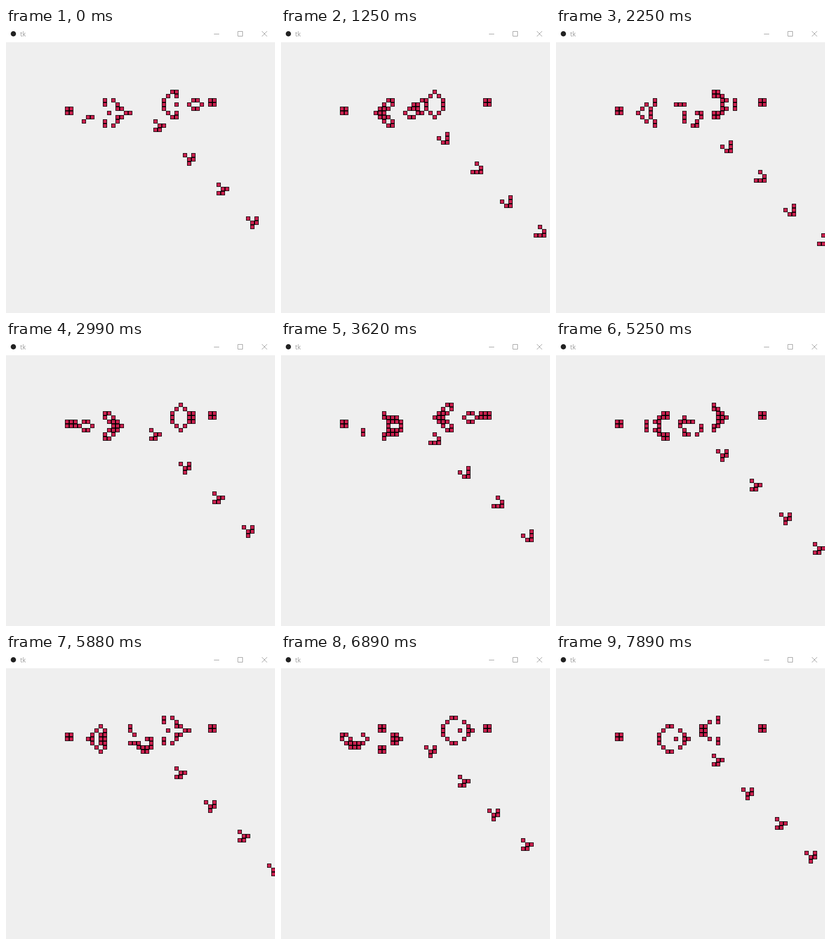
These frames come from a looping animation (511x540 px, 8 s). An HTML page with a canvas:

```html
<!DOCTYPE html>
<html>
<head>
<meta charset="utf-8">
<style>
  html, body { margin: 0; width: 100%; height: 100%; overflow: hidden; background: #efefef; }
  canvas, svg { position: absolute; left: 0; top: 0; display: block; }
  text { font: 12px "Open Sans", "Noto Sans", sans-serif; fill: #999; }
</style>
</head>
<body>
<canvas id="board" width="511" height="540"></canvas>
<svg width="511" height="27">
  <rect width="511" height="27" fill="#fff"/>
  <circle cx="14" cy="11" r="5" fill="#222"/>
  <text x="27" y="16">tk</text>
  <g fill="none" stroke="#999">
    <path d="M395 11.5h10M440.500 6.500h9v9h-9z"/>
    <path d="M486 6l10 10M496 6l-10 10"/>
  </g>
</svg>
<script>
const LOOP = 8000, SIZE = 100, CELL = 8;
const GEN_MS = 116.8, GEN_OFFSET = 54.2;

// Screen refreshes as runs of [first ms, last ms, count]
const refreshRuns = [
  [0, 0, 1], [130, 230, 2], [380, 1120, 7], [1250, 2000, 7], [2120, 2870, 7],
  [2990, 3740, 7], [3870, 4230, 4], [4380, 4740, 4], [4890, 4990, 2],
  [5130, 5880, 7], [6010, 6140, 2], [6380, 6380, 1], [6520, 7270, 7], [7390, 7890, 5]
];
const refreshes = refreshRuns.flatMap(([first, last, count]) =>
  Array.from({ length: count }, (_, i) =>
    Math.round((first + (last - first) * i / Math.max(1, count - 1)) / 10) * 10));

const block = "oo/oo";
const gliderA = "o/.oo/oo";
const gliderB = "o.o/.oo/.o";

function stamp(grid, x, y, pattern) {
  pattern.split("/").forEach((row, j) =>
    [...row].forEach((c, i) => { if (c === "o") grid[(y + j) * SIZE + x + i] = 1; }));
}

function step(grid) {
  const next = new Uint8Array(SIZE * SIZE);
  for (let y = 1; y < SIZE - 1; y++) {
    for (let x = 1; x < SIZE - 1; x++) {
      const k = y * SIZE + x;
      let n = -grid[k];
      for (let dy = -SIZE; dy <= SIZE; dy += SIZE)
        n += grid[k + dy - 1] + grid[k + dy] + grid[k + dy + 1];
      next[k] = n === 3 || (n === 2 && grid[k]) ? 1 : 0;
    }
  }
  return next;
}

const start = new Uint8Array(SIZE * SIZE);
stamp(start, 14, 19, block);
stamp(start, 48, 17, block);
stamp(start, 18, 21, ".oo/o");
stamp(start, 23, 17, "o.o/o..o/...oo/.o...oo/...oo/o..o/o.o");
stamp(start, 37, 15, "..oo/.o.o/o/o..o/o/.o.o/..oo");
stamp(start, 43, 17, ".oo/o..o/.oo");
stamp(start, 35, 22, gliderA);
stamp(start, 42, 30, gliderB);
stamp(start, 50, 37, gliderA);
stamp(start, 57, 45, gliderB);

const generations = [start];
while (generations.length < 70) generations.push(step(generations.at(-1)));

const ctx = document.getElementById("board").getContext("2d");

function draw(grid) {
  ctx.fillStyle = "#efefef";
  ctx.fillRect(0, 0, 511, 540);
  grid.forEach((alive, k) => {
    if (!alive) return;
    const x = k % SIZE * CELL, y = Math.floor(k / SIZE) * CELL - 3;
    ctx.fillStyle = "#000";
    ctx.fillRect(x, y, CELL, CELL);
    ctx.fillStyle = "#c8204e";
    ctx.fillRect(x + 1, y + 1, CELL - 2, CELL - 2);
  });
}

const origin = performance.now();
function frame() {
  const t = (performance.now() - origin) % LOOP;
  const shown = refreshes.findLast(r => r <= t);
  draw(generations[Math.floor((shown + GEN_OFFSET) / GEN_MS)]);
  requestAnimationFrame(frame);
}
frame();
</script>
</body>
</html>
```
